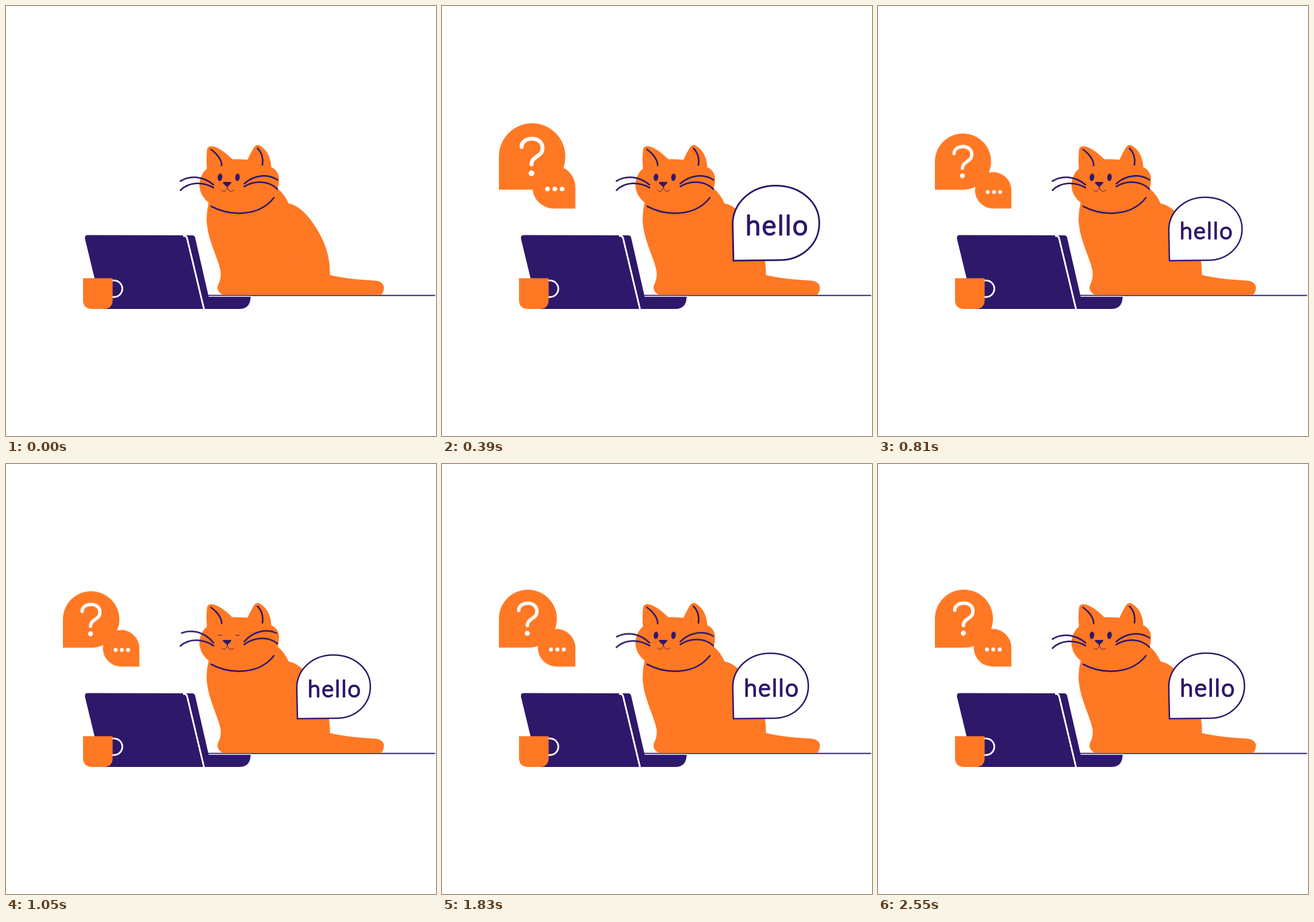
Animation of 748x748 px, one loop 2.73 s. Source, as an HTML page:

```html
<!DOCTYPE html>
<html lang="en">
<head>
<meta charset="utf-8">
<title>Cat says hello</title>
<style>
  :root { --orange: #ff7824; --ink: #2e186a; --loop: 2730ms linear infinite; }
  html, body { margin: 0; width: 100%; height: 100%; overflow: hidden; background: #fff; }
  svg { display: block; width: 100%; height: 100%; }
  .o { fill: var(--orange); }
  .i { fill: var(--ink); }
  .w { fill: #fff; }
  .line { fill: none; stroke: var(--ink); stroke-width: 2.7; stroke-linecap: round; }
  .white { fill: none; stroke: #fff; stroke-width: 3; }
  text {
    font: 300 41px Lato, "Open Sans", sans-serif; letter-spacing: 2.4px;
    fill: var(--ink); stroke: var(--ink); stroke-width: 2.5; stroke-linejoin: round;
  }

  .pop { animation: pop var(--loop); }
  .eye { transform-box: fill-box; transform-origin: center; animation: blink var(--loop); }
  .whisker { animation: twitch var(--loop); }

  /* Linear growth, then a damped bounce */
  @keyframes pop {
    0% { transform: scale(0); }
    10.99% { transform: scale(1); animation-timing-function: cubic-bezier(.33, .67, .67, 1); }
    17.03% { transform: scale(1.18); animation-timing-function: cubic-bezier(.35, 0, .55, 1); }
    32.6% { transform: scale(.954); animation-timing-function: cubic-bezier(.37, 0, .63, 1); }
    48.35% { transform: scale(1.012); animation-timing-function: cubic-bezier(.37, 0, .63, 1); }
    64.1% { transform: scale(.998); }
    79.12%, 100% { transform: scale(1); }
  }
  @keyframes blink {
    0%, 32.97%, 43.96%, 82.42%, 93.41%, 100% { transform: scaleY(1); animation-timing-function: ease-in-out; }
    38.46%, 87.91% { transform: scaleY(.09); animation-timing-function: ease-in-out; }
  }
  @keyframes twitch {
    0%, 30.77%, 46.15%, 63.74%, 79.12%, 100% { transform: rotate(0deg); animation-timing-function: ease-in-out; }
    38.46%, 71.43% { transform: rotate(var(--turn)); animation-timing-function: ease-in-out; }
  }
</style>
</head>
<body>
<svg viewBox="0 0 748 748">
  <!-- laptop and table -->
  <path class="i" d="M142 398.5L324 399Q328 399 329 403L352.5 505.6H425.5V508Q424 527 406 527H167L137.4 405Q136.500 398.500 142 398.500Z"/>
  <path class="white" d="M308 400H311Q314 400.500 315 404L344.500 527.500"/>
  <path class="line" style="stroke-width:2;stroke-linecap:butt" d="M352 503.600H746.500"/>
  <path class="white" style="stroke-width:1" d="M352.500 505.100H426"/>

  <!-- cup -->
  <path class="white" d="M185 477.500H188A14.300 14.300 0 0 1 188 506.200H185"/>
  <path class="o" d="M134 473.500H185.500V511Q185.500 527 169.500 527H150Q134 527 134 511Z"/>

  <!-- cat -->
  <path class="o" d="M349.500 283C348.500 270 348.500 258 350 249C351 243 359 243 366 246C377 251 386 259 393.500 266.500Q407 266 420 267.500C424 259 428 251 432 245Q436 240 441 242.500C455 250 461 266 461.500 280.500C470 284 475 292 475 301Q475 310 472.500 317.500Q485 328 491.500 343.500C511 347 527 367 537 382C554 408 564 434 563.500 468C588 474 615 476 640 477.500C652 478 657.500 484 657.500 490Q657.500 496 653 502.500H378C370 500 366 492 369 485C373 477 374.500 469 373 460C369 438 349 404 349 370Q349 356 352.500 342C342 334 336.500 322 336.500 311C336.500 300 342 289 349.500 283Z"/>
  <path class="line" d="M356.500 249.500C366 256 376 268 375 277.500M437.500 247.500C445 255 447.500 266 446 276.500M357 348.500C390 366 440 367 466 333.500"/>
  <g class="line">
    <path class="whisker" style="--turn:10.6deg;transform-origin:361px 311px" d="M361 311C343 296 321 294 303.500 304.500"/>
    <path class="whisker" style="--turn:4deg;transform-origin:361px 316px" d="M361 316C342 305 318 306 303.500 320.500"/>
    <path class="whisker" style="--turn:-8.2deg;transform-origin:414.500px 309px" d="M414.500 309C431 294 455 291 472 302.500"/>
    <path class="whisker" style="--turn:-6deg;transform-origin:414.500px 314px" d="M414.500 314C430 304 456 302 472 318.500"/>
  </g>
  <g class="i">
    <g class="eye"><ellipse cx="372.200" cy="298" rx="4" ry="6.500" transform="rotate(6 372.200 298)"/></g>
    <g class="eye"><ellipse cx="402.700" cy="298" rx="4" ry="6.500" transform="rotate(6 402.700 298)"/></g>
    <path d="M379 306H390.500Q393 306.500 391 309L386.500 313.500Q385 315 383 313.500L378 309Q376 306.500 379 306Z"/>
  </g>
  <path class="line" style="stroke-width:.9" d="M384.800 314C384.500 322 378 325 375 320M385 314C386 322 392 325 396.500 320"/>

  <!-- question bubble -->
  <g transform="translate(99 319.500)"><g class="pop">
    <path class="o" d="M0 0V-50.500A50.500 50.500 0 1 1 50.500 0Z"/>
    <path class="white" style="stroke-width:6;stroke-linecap:round" d="M34.500 -65C34.500 -72.500 41.500 -77.500 50.500 -77.500C60 -77.500 66.300 -71.500 66.300 -63.500C66.300 -49.500 50 -52 49.500 -38.500"/>
    <circle class="w" cx="49.500" cy="-25" r="4.400"/>
  </g></g>

  <!-- typing bubble -->
  <g transform="translate(232 352.300)"><g class="pop">
    <path class="o" d="M0 0H-32.700A32.700 32.700 0 1 1 0 -32.700Z"/>
    <g class="w">
      <circle cx="-42.400" cy="-29.700" r="3.500"/>
      <circle cx="-31.300" cy="-29.700" r="3.500"/>
      <circle cx="-20.200" cy="-29.700" r="3.500"/>
    </g>
  </g></g>

  <!-- greeting bubble -->
  <g transform="translate(507 443)"><g class="pop">
    <path class="line" style="fill:#fff;stroke-width:2.600" d="M0 0L-1.200 -55C-1.200 -88 27 -114 64 -114C102 -114 130.500 -89 130.500 -57C130.500 -25 104 -.8 70 -.8Z"/>
    <text x="18.500" y="-39.500">hello</text>
  </g></g>
</svg>
</body>
</html>
```
